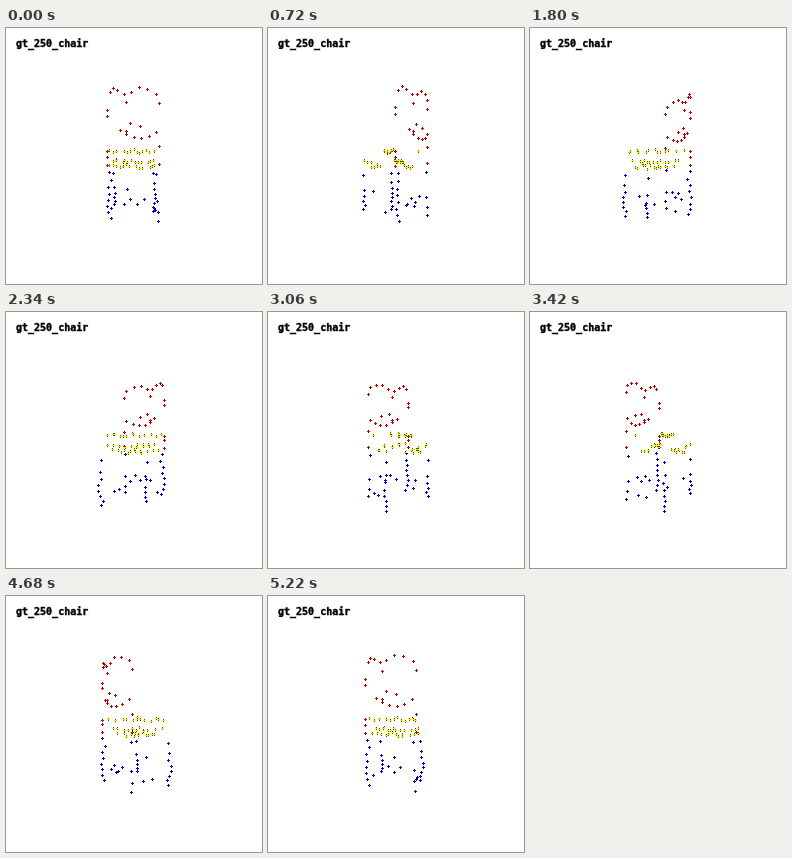
These frames come from a looping animation (256x256 px, 5400 ms). An HTML page with a canvas:

```html
<!DOCTYPE html>
<html lang="en">
<head>
<meta charset="utf-8">
<title>Turning chair</title>
<style>
  html, body { margin: 0; width: 100%; height: 100%; overflow: hidden; background: #fff; }
  canvas { display: block; width: 256px; height: 256px; }
</style>
</head>
<body>
<canvas id="stage" width="256" height="256"></canvas>
<script>
const ctx = document.getElementById('stage').getContext('2d');
const STEP = 180, STEPS = 30;
const MID = 128, EYE = 235;

const RED = { fill: '#d80000', edge: '#680000' };
const YELLOW = { fill: '#f0f000', edge: '#505000' };
const BLUE = { fill: '#0000d8', edge: '#000060' };

// Axes: x right, y down, z towards the viewer
const cloud = [];
const add = (x, y, z, ink) => cloud.push({ x, y, z, ink });
const repeat = (n, make) => { for (let i = 0; i < n; i++) make(i, n > 1 ? i / (n - 1) : 0); };

let seed = 7;
function wobble(size) {
  seed = (seed * 16807) % 2147483647;
  return (seed / 2147483647 * 2 - 1) * size;
}

// The backrest bends forward at its sides
const addBack = (x, y) => add(x, y, 28 - 0.011 * x * x, RED);

function buildBack() {
  repeat(8, (i, t) => addBack(-22 + 42 * t ** 1.4, -58 + 3 * Math.sin(1.5 * (i - 2.2))));
  repeat(3, i => {
    const x = -12.5 + 9 * i;
    addBack(x, -29 + 0.05 * (x + 2) ** 2);
  });
  repeat(5, i => {
    const x = -7 + 6.7 * i;
    addBack(x, -16.2 - 0.025 * (x - 5) ** 2);
  });
  for (const y of [-42, -36.6, -4.5, 0.5, 8.2]) addBack(-24.7, y);
  for (const y of [-47.7, -9, 7.3]) addBack(22.5, y);
  addBack(-7, -47.7);
  addBack(-7, -22.4);
}

// Three layers of evenly scattered points
function buildSeat() {
  const layers = [-5, 5, 10];
  repeat(39, i => {
    const u = (0.5 + i * 0.7549) % 1, v = (0.5 + i * 0.5698) % 1;
    add(-25 + 50 * u, layers[i % 3] + wobble(1.8), -27 + 46 * v, YELLOW);
  });
}

function buildLeg(x, z, n, top, bottom, ease) {
  repeat(n, (i, t) => add(x + wobble(2), top + (bottom - top) * t ** ease, z + wobble(1.5), BLUE));
}

function buildLegs() {
  buildLeg(-22.5, 22, 8, 14.5, 56.5, 0.9);
  buildLeg(21.7, 22.5, 4, 16, 59, 0.5);
  buildLeg(-21.7, -24.5, 6, 19, 53, 0.5);
  buildLeg(22.5, -27, 8, 19, 61, 0.7);
  repeat(4, i => add(-9.2 + 6 * i, 41 + (i % 2 ? -2.3 : 2.3), 22, BLUE));
  add(-7.7, 36.5, -25, BLUE);
  add(20.5, 52.5, -4, BLUE);
  add(20.5, 52.5, 7, BLUE);
  add(-22, 51, 6, BLUE);
}

function project({ x, y, z, ink }, angle) {
  const c = Math.cos(angle), s = Math.sin(angle);
  const depth = z * c - x * s;
  const scale = EYE / (EYE - depth);
  return {
    x: Math.round(MID + (x * c + z * s) * scale),
    y: Math.round(MID + y * scale),
    depth, ink
  };
}

function drawDot({ x, y, ink }) {
  ctx.fillStyle = ink.edge;
  ctx.fillRect(x, y - 1, 1, 3);
  ctx.fillStyle = ink.fill;
  ctx.fillRect(x - 1, y, 3, 1);
}

function drawTitle() {
  ctx.fillStyle = ctx.strokeStyle = '#000';
  ctx.lineWidth = 0.4;
  ctx.font = 'bold 10px "DejaVu Sans Mono", "Liberation Mono", monospace';
  ctx.fillText('gt_250_chair', 10, 19);
  ctx.strokeText('gt_250_chair', 10, 19);
}

function draw(step) {
  ctx.fillStyle = '#fff';
  ctx.fillRect(0, 0, 256, 256);
  drawTitle();
  const angle = step / STEPS * Math.PI * 2;
  cloud.map(p => project(p, angle))
    .sort((a, b) => a.depth - b.depth)
    .forEach(drawDot);
}

buildBack();
buildSeat();
buildLegs();

const start = performance.now();
let shown = -1;
function tick() {
  const step = Math.floor((performance.now() - start) / STEP) % STEPS;
  if (step !== shown) draw(shown = step);
  requestAnimationFrame(tick);
}
tick();
</script>
</body>
</html>
```
